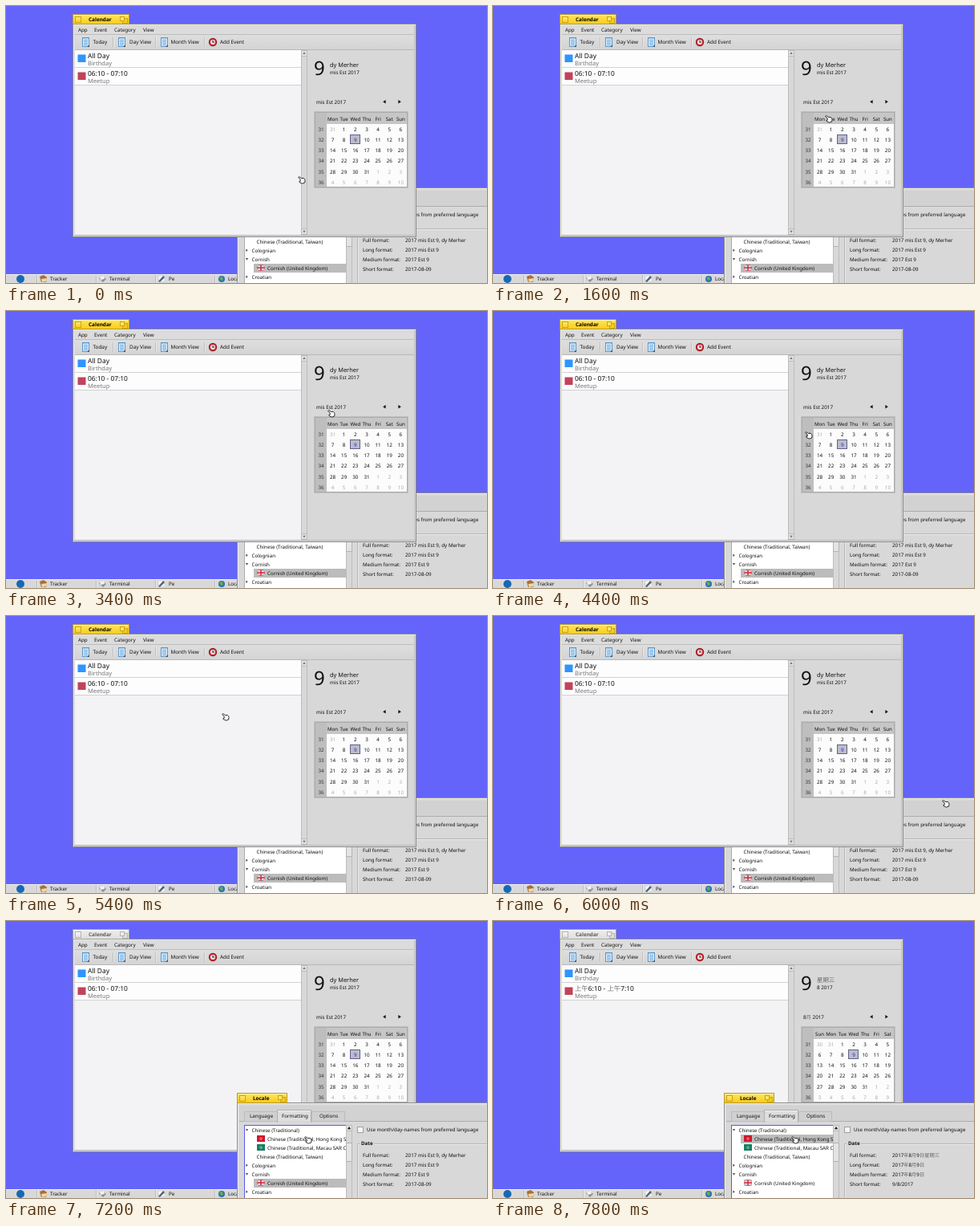
Recreate the animation shown at these times as an HTML page with a canvas. Size 600 by 345 pixels, loop 8000 ms.

```html
<!DOCTYPE html>
<html lang="en">
<head>
<meta charset="utf-8">
<title>Calendar and locale</title>
<style>
html, body { margin: 0; width: 100%; height: 100%; overflow: hidden; background: #6464fa; }
canvas { display: block; width: 600px; height: 345px; }
</style>
</head>
<body>
<canvas id="stage" width="600" height="345"></canvas>
<script>
const ctx = document.getElementById('stage').getContext('2d');
const LOOP = 8000, STEP = 200;
const RAISE_AT = 6200, PICK_AT = 7400, RELOAD_AT = 7600;
const FONT = '"Noto Sans", "Noto Sans CJK TC", "Noto Sans CJK SC", "Noto Sans CJK JP", sans-serif';
const UI = 6.25, PANEL = '#d8d8d8', LINE = '#adadad', INK = '#101010';

const cornish = {
  weekday: 'dy Merher', month: 'mis Est 2017', head: 'mis Est 2017', time: '06:10 - 07:10',
  days: 'Mon Tue Wed Thu Fri Sat Sun', lead: 1,
  formats: ['2017 mis Est 9, dy Merher', '2017 mis Est 9', '2017 Est 9', '2017-08-09']
};
const chinese = {
  weekday: '星期三', month: '8 2017', head: '8月 2017', time: '上午6:10 - 上午7:10',
  days: 'Sun Mon Tue Wed Thu Fri Sat', lead: 2,
  formats: ['2017年8月9日星期三', '2017年8月9日', '2017年8月9日', '9/8/2017']
};

// Pointer waypoints: time, x, y
const path = [
  [0, 364, 212], [600, 364, 212], [1000, 320, 160], [1200, 338, 128], [1400, 385, 123],
  [1600, 414, 136], [1800, 406, 123], [2200, 403, 78], [2400, 414, 64], [2600, 421, 66],
  [2800, 421, 66], [3200, 402, 115], [3400, 401, 123], [3600, 424, 124], [4000, 468, 166],
  [4600, 350, 142], [5200, 272, 122], [5400, 269, 121], [6000, 560, 229], [6200, 562, 230],
  [6400, 558, 231], [7000, 388, 267], [7200, 372, 268], [8000, 372, 268]
];

function pointerAt(t) {
  const i = path.findIndex(p => p[0] > t);
  const [a, b] = [path[i - 1], path[i]];
  const k = (t - a[0]) / (b[0] - a[0]);
  return [1, 2].map(n => Math.round(a[n] + (b[n] - a[n]) * k));
}

function fill(x, y, w, h, color) {
  ctx.fillStyle = color;
  ctx.fillRect(x, y, w, h);
}

function box(x, y, w, h, color, edge) {
  fill(x, y, w, h, edge);
  fill(x + 1, y + 1, w - 2, h - 2, color);
}

function shade(y, h, top, bottom) {
  const g = ctx.createLinearGradient(0, y, 0, y + h);
  g.addColorStop(0, top);
  g.addColorStop(1, bottom);
  return g;
}

function shape(points, color) {
  ctx.beginPath();
  points.forEach(([x, y]) => ctx.lineTo(x, y));
  ctx.closePath();
  ctx.fillStyle = color;
  ctx.fill();
}

function disc(x, y, r, color) {
  ctx.beginPath();
  ctx.arc(x, y, r, 0, Math.PI * 2);
  ctx.fillStyle = color;
  ctx.fill();
}

function arrow(x, y, dir, r = 2, color = INK) {
  const pts = [[r * .8, 0], [-r * .7, -r], [-r * .7, r]];
  const turn = dir * Math.PI / 2, c = Math.cos(turn), s = Math.sin(turn);
  shape(pts.map(([a, b]) => [x + a * c - b * s, y + a * s + b * c]), color);
}

// Text centred vertically on y; CJK runs are drawn lighter
function label(str, x, y, { size = UI, color = INK, bold = false, center = false } = {}) {
  ctx.font = `${bold ? 'bold ' : ''}${size}px ${FONT}`;
  ctx.textRendering = 'geometricPrecision';
  ctx.fillStyle = color;
  if (center) x -= ctx.measureText(str).width / 2;
  for (const run of str.match(/[\u4e00-\u9fff]+|[^\u4e00-\u9fff]+/g)) {
    ctx.globalAlpha = run > '\u4e00' ? .58 : 1;
    ctx.fillText(run, x, y + size * .36);
    x += ctx.measureText(run).width;
  }
  ctx.globalAlpha = 1;
}

function clipped(x, y, w, h, draw) {
  ctx.save();
  ctx.beginPath();
  ctx.rect(x, y, w, h);
  ctx.clip();
  draw();
  ctx.restore();
}

function windowFrame(title, x, y, w, h, tabW, active) {
  const top = active ? '#ffe768' : '#eeeeee', low = active ? '#fccb10' : '#dedede';
  const edge = active ? '#c9a41c' : '#b4b4b4';
  box(x, y + 12, w, h, PANEL, '#8c8c8c');
  fill(x + 1, y + 13, w - 2, 1, '#ececec');
  fill(x + 1, y + 13, 1, h - 2, '#ececec');
  fill(x + 2, y + h + 9, w - 3, 1, '#b8b8b8');
  fill(x + w - 3, y + 14, 1, h - 4, '#c2c2c2');
  box(x, y, tabW, 13, shade(y, 13, top, low), active ? '#b59a3a' : '#a2a2a2');
  fill(x + 1, y + 1, tabW - 2, 1, active ? '#fff2a2' : '#fafafa');
  box(x + 3, y + 3, 8, 8, shade(y + 3, 8, active ? '#fff08c' : '#fafafa', low), edge);
  box(x + tabW - 9, y + 5, 7, 7, low, edge);
  box(x + tabW - 12, y + 3, 6, 6, top, edge);
  label(title, x + 20, y + 7, { size: 6.4, bold: true, color: active ? '#000' : '#5c5c5c' });
}

function scrollbar(x, y, h) {
  box(x, y, 8, h, '#d8d8d8', '#bcbcbc');
  box(x, y, 8, 8, '#e0e0e0', '#bcbcbc');
  arrow(x + 4, y + 3.8, 3, 1.8, '#777');
}

function pageIcon(x) {
  box(x, 39, 9, 12, '#e3f1fc', '#5a97cc');
  fill(x + 1, 40, 7, 1, '#9dcbf0');
  for (let y = 42; y < 50; y += 2) fill(x + 2, y, 5, 1, '#62a2d8');
  shape([[x + 6, 51], [x + 9, 48], [x + 9, 51]], '#3f5468');
}

function clockIcon(x, y) {
  disc(x, y, 5.2, '#7d1a20');
  disc(x, y, 4.6, '#cf2530');
  disc(x, y, 3, '#f4e9e7');
  fill(x - .5, y - 2.3, 1, 2.8, '#333');
  fill(x - .5, y - .5, 2.6, 1, '#333');
}

function taskbar() {
  fill(0, 334, 290, 11, PANEL);
  fill(0, 334, 290, 1, '#f0f0f0');
  disc(18, 340, 5, '#1768b4');
  ['Tracker', 'Terminal', 'Pe', 'Locale'].forEach((name, i) => {
    const x = 38 + i * 74;
    fill(x, 335, 1, 10, '#bcbcbc');
    fill(x + 1, 335, 1, 10, '#ebebeb');
    label(name, x + 17, 339.7);
  });
  shape([[42, 337], [47, 335], [51, 338], [50, 344], [44, 344]], '#a5703c');
  shape([[44, 340], [51, 339], [50, 343], [45, 344]], '#ecd9a6');
  shape([[116, 339], [120, 336], [125, 340], [121, 344]], '#8b8f94');
  shape([[117, 337], [122, 336], [123, 340], [118, 341]], '#f2f2f2');
  shape([[190, 337], [195, 336], [198, 342], [192, 344]], '#f6f6f6');
  shape([[190, 343], [196, 336], [198, 338], [192, 344]], '#51647c');
  disc(269, 340, 4, '#2b70b8');
  shape([[266, 338], [270, 337], [271, 341], [268, 342]], '#67ad4b');
}

function eventRow(y, color, title, sub) {
  fill(86, y, 282, 21, '#fdfdfd');
  fill(86, y + 21, 282, 1, '#d2d2d2');
  fill(89.5, y + 5.5, 10, 9.5, color);
  label(title, 102, y + 7, { size: 8.4 });
  label(sub, 102, y + 15.8, { size: 7.55, color: '#777' });
}

function monthGrid(loc) {
  const colX = i => 407.5 + i * 14.15, rowY = i => 153.5 + i * 13.2;
  box(384, 131, 118, 96, '#fcfcfc', '#c0c0c0');
  box(385, 132, 116, 94, '#fcfcfc', '#acacac');
  fill(386, 133, 114, 14, '#c6c6c6');
  fill(386, 133, 14, 92, '#bebebe');
  loc.days.split(' ').forEach((d, i) => label(d, colX(i), 140.5, { size: 6.1, center: true }));
  for (let row = 0; row < 6; row++) {
    label(String(31 + row), 393, rowY(row), { color: '#333', center: true });
    for (let col = 0; col < 7; col++) {
      const n = row * 7 + col + 1 - loc.lead;
      const outside = n < 1 || n > 31, today = n === 9;
      const x = colX(col), y = rowY(row);
      if (today) box(Math.round(x - 6.8), 160, 13, 12, '#bcbcc6', '#62628c');
      label(String(n < 1 ? n + 31 : n > 31 ? n - 31 : n), x, y,
        { color: today ? '#2020f0' : outside ? '#aaa' : INK, center: true });
    }
  }
}

function calendarWindow(active, loc) {
  windowFrame('Calendar', 83, 10, 429, 266, 71, active);
  fill(86, 25, 423, 10, '#dcdcdc');
  fill(86, 35, 423, 1, '#bebebe');
  [['App', 90], ['Event', 110], ['Category', 135], ['View', 171]]
    .forEach(([s, x]) => label(s, x, 30.2));
  fill(86, 36, 423, 18, shade(36, 18, '#dedede', '#d4d4d4'));
  fill(86, 54, 423, 1, '#b8b8b8');
  [133, 186, 247].forEach(x => {
    fill(x, 39, 1, 12, '#c0c0c0');
    fill(x + 1, 39, 1, 12, '#e8e8e8');
  });
  [95, 140, 193].forEach(pageIcon);
  clockIcon(258, 45);
  [['Today', 108.5], ['Day View', 154], ['Month View', 205.5], ['Add Event', 267]]
    .forEach(([s, x]) => label(s, x, 45.2, { size: 6.35 }));

  fill(86, 55, 282, 230, '#f3f2f4');
  eventRow(55, '#3094fc', 'All Day', 'Birthday');
  eventRow(77, '#c1435b', loc.time, 'Meetup');
  scrollbar(368, 55, 230);
  box(368, 277, 8, 8, '#e0e0e0', '#bcbcbc');
  arrow(372, 281, 1, 1.8, '#777');

  label('9', 384, 77.8, { size: 24 });
  label(loc.weekday, 404, 73, { size: 7.4 });
  label(loc.month, 404, 83);
  label(loc.head, 387, 119.3, { size: 6.3 });
  arrow(472, 119.2, 2, 2.3);
  arrow(491, 119.2, 0, 2.3);
  monthGrid(loc);
}

function flag(kind, y) {
  const x = 313;
  fill(x, y - 4, 10, 8, { hk: '#d0182c', mo: '#168062', uk: '#3f4f8e' }[kind]);
  if (kind !== 'uk') {
    for (let i = 0; i < 5; i++) {
      const a = i * Math.PI * .4 - Math.PI / 2;
      disc(x + 5 + Math.cos(a) * 1.2, y + Math.sin(a) * 1.2, .5, '#fff');
    }
    return;
  }
  clipped(x, y - 4, 10, 8, () => {
    [['#fff', 1.8], ['#d33', .6]].forEach(([color, w]) => {
      ctx.strokeStyle = color;
      ctx.lineWidth = w;
      ctx.beginPath();
      ctx.moveTo(x, y - 4); ctx.lineTo(x + 10, y + 4);
      ctx.moveTo(x + 10, y - 4); ctx.lineTo(x, y + 4);
      ctx.stroke();
    });
    fill(x + 3.5, y - 4, 3, 8, '#fff');
    fill(x, y - 1.5, 10, 3, '#fff');
    fill(x + 4.2, y - 4, 1.6, 8, '#d22a37');
    fill(x, y - .8, 10, 1.6, '#d22a37');
  });
}

const languages = [
  ['Chinese (Traditional)', 306.5, 'open'],
  ['Chinese (Traditional, Hong Kong SAR China)', 326, 'hk'],
  ['Chinese (Traditional, Macau SAR China)', 326, 'mo'],
  ['Chinese (Traditional, Taiwan)', 312.5],
  ['Colognian', 306.5, 'closed'],
  ['Cornish', 306.5, 'open'],
  ['Cornish (United Kingdom)', 326, 'uk'],
  ['Croatian', 306.5, 'closed']
];

function languageList(active, picked) {
  box(297, 254, 128, 100, '#fff', active ? '#5858ee' : '#acacac');
  clipped(298, 255, 126, 90, () => languages.forEach(([name, x, mark], i) => {
    const y = 260.3 + i * 11;
    if (i === picked) fill(309, Math.round(y - 5), 115, 11, '#bcbcbc');
    if (mark === 'open') arrow(300.5, y, 1, 1.7, '#555');
    else if (mark === 'closed') arrow(300.5, y, 0, 1.7, '#555');
    else if (mark) flag(mark, Math.round(y));
    label(name, x, y, { size: 6.2 });
  }));
  scrollbar(424, 254, 100);
  arrow(428, 257.8, 3, 2);
  box(424, 276, 8, 24, '#e4e4e4', '#b4b4b4');
}

function localeWindow(active, picked, loc) {
  windowFrame('Locale', 288, 214, 330, 140, 63, active);
  fill(291, 230, 309, 19, '#d2d2d2');
  fill(291, 249, 309, 1, LINE);
  fill(291, 250, 309, 95, PANEL);
  [297, 338, 381].forEach((x, i) => {
    if (i === 1) {
      box(x, 235, 43, 16, '#dedede', '#b0b0b0');
      fill(x + 1, 236, 41, 1, '#f0f0f0');
      fill(x + 1, 249, 41, 2, PANEL);
    } else {
      box(x, 237, 42, 13, '#d0d0d0', '#bcbcbc');
    }
  });
  label('Language', 304, 243);
  label('Formatting', 344, 242.8);
  label('Options', 391, 243);
  languageList(active, picked);

  box(438, 256, 8, 8, '#f5f5f5', '#a0a0a0');
  label('Use month/day-names from preferred language', 450, 260.2, { size: 6.17 });
  box(438, 277, 170, 80, PANEL, '#b6b6b6');
  fill(439, 278, 161, 1, '#eaeaea');
  fill(439, 278, 1, 67, '#eaeaea');
  fill(441, 275, 18, 5, PANEL);
  label('Date', 443, 277, { bold: true, size: 6.2 });
  ['Full', 'Long', 'Medium', 'Short'].forEach((kind, i) => {
    const y = 292 + i * 12;
    label(kind + ' format:', 445, y, { size: 6.15 });
    label(loc.formats[i], 498, y);
  });
}

function pointer(x, y) {
  ctx.save();
  ctx.translate(x, y + .5);
  ctx.beginPath();
  ctx.moveTo(.6, .8);
  ctx.quadraticCurveTo(1, -.2, 2.2, .5);
  ctx.lineTo(4.6, 2);
  ctx.lineTo(7.4, 2);
  ctx.quadraticCurveTo(9, 2.8, 9, 5);
  ctx.lineTo(8.6, 7.6);
  ctx.lineTo(5.4, 8.6);
  ctx.lineTo(2, 7);
  ctx.quadraticCurveTo(1.2, 5.4, 3.2, 5.6);
  ctx.lineTo(3.2, 3.6);
  ctx.closePath();
  ctx.fillStyle = '#fff';
  ctx.fill();
  ctx.lineWidth = .9;
  ctx.strokeStyle = '#181818';
  ctx.stroke();
  ctx.restore();
}

function draw(t) {
  const raised = t >= RAISE_AT, picked = t >= PICK_AT;
  const drawCalendar = () => calendarWindow(!raised, t >= RELOAD_AT ? chinese : cornish);
  const drawLocale = () => localeWindow(raised, picked ? 1 : 6, picked ? chinese : cornish);
  fill(0, 0, 600, 345, '#6464fa');
  taskbar();
  (raised ? [drawCalendar, drawLocale] : [drawLocale, drawCalendar]).forEach(paint => paint());
  pointer(...pointerAt(t));
}

function tick() {
  const t = performance.now() % LOOP;
  draw(Math.floor(t / STEP) * STEP);
  requestAnimationFrame(tick);
}
tick();
</script>
</body>
</html>
```
